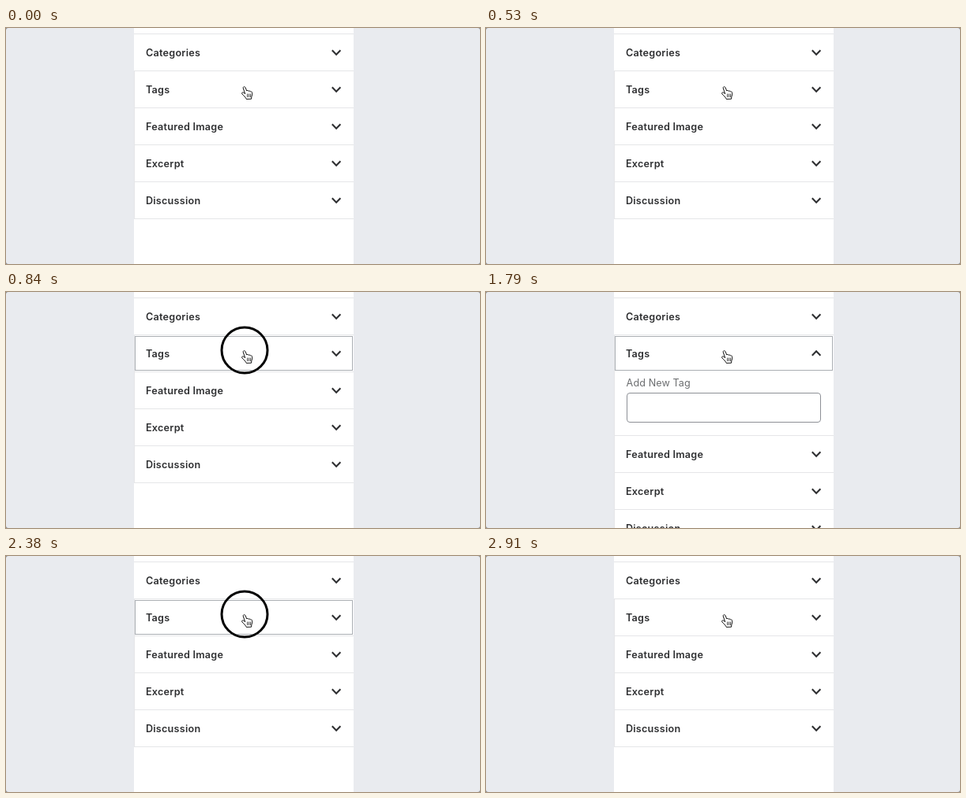
An HTML page with a canvas for the animation above (3220 ms loop, 600x300 px).

```html
<!DOCTYPE html>
<html lang="en">
<head>
<meta charset="utf-8">
<title>Collapsible settings panel</title>
<style>
html, body { margin: 0; width: 100%; height: 100%; overflow: hidden; background: #e9ebef; }
canvas { display: block; width: 600px; height: 300px; }
</style>
</head>
<body>
<canvas id="stage"></canvas>
<script>
const W = 600, H = 300, LOOP = 3220;
const OPEN_AT = 910, CLOSE_AT = 2380;
const CLICKS = [840, 2380], CLICK_TIME = 70;
const PANEL = { x: 162, w: 278 };
const ROW = 47, FIRST = 31, EXTRA = 81;
const LABELS = ["Categories", "Tags", "Featured Image", "Excerpt", "Discussion"];
const FONT = 'Inter, "Open Sans", sans-serif';
const INK = "#2e2f31", LINE = "#e5e6e8";

const canvas = document.getElementById("stage");
const ctx = canvas.getContext("2d");
const ratio = window.devicePixelRatio || 1;
canvas.width = W * ratio;
canvas.height = H * ratio;

function text(label, x, y, weight, size, spacing, color) {
  ctx.font = `${weight} ${size}px ${FONT}`;
  ctx.letterSpacing = `${spacing}px`;
  ctx.fillStyle = color;
  ctx.fillText(label, x, y);
}

function divider(y) {
  ctx.fillStyle = LINE;
  ctx.fillRect(PANEL.x, y, PANEL.w, 1);
}

function chevron(y, up) {
  const d = up ? -2.7 : 2.7;
  ctx.beginPath();
  ctx.moveTo(412.8, y - d);
  ctx.lineTo(418.1, y + d);
  ctx.lineTo(423.4, y - d);
  ctx.strokeStyle = INK;
  ctx.lineWidth = 2.1;
  ctx.lineJoin = "miter";
  ctx.stroke();
}

function focusRing() {
  ctx.strokeStyle = "#555d66";
  ctx.lineWidth = 1;
  ctx.setLineDash([1, 1]);
  ctx.strokeRect(163.5, 56.5, 275, 43);
  ctx.setLineDash([]);
}

function tagField() {
  text("Add New Tag", 177.6, 120, 400, 12.6, 0.1, "#6c6e70");
  ctx.beginPath();
  ctx.roundRect(178.5, 128.5, 245, 37, 3.5);
  ctx.strokeStyle = "#8d9096";
  ctx.lineWidth = 1;
  ctx.stroke();
}

function clickRing() {
  ctx.beginPath();
  ctx.arc(302, 74, 29, 0, Math.PI * 2);
  ctx.strokeStyle = "#000";
  ctx.lineWidth = 3;
  ctx.stroke();
}

const hand = new Path2D(
  "M4.6 9.8 L2.3 3.2 C1.6 1.1 4.1 .1 5 2.1 L6.8 6.4" +
  "C7.2 5.5 8.9 5.6 9.2 6.8 C9.9 6 11.2 6.3 11.5 7.4" +
  "C12.4 6.9 13.5 7.5 13.6 8.8 C13.8 10.6 13.6 12 12.9 13.6" +
  "L12.5 16.6 L6.2 16.8 C5.8 15.2 4 13.6 2.8 12.2" +
  "L.8 10.2 C-.2 8.8 1.6 7.6 2.9 8.6 Z"
);
const creases = new Path2D("M7.5 10.4 V14 M9.5 10.4 V14 M11.5 10.4 V14");

function cursor() {
  ctx.save();
  ctx.translate(298, 73.6);
  ctx.lineJoin = ctx.lineCap = "round";
  ctx.fillStyle = "#fff";
  ctx.fill(hand);
  ctx.strokeStyle = "#111";
  ctx.lineWidth = 1;
  ctx.stroke(hand);
  ctx.lineWidth = 0.8;
  ctx.stroke(creases);
  ctx.restore();
}

function background() {
  ctx.fillStyle = "#85878a";
  ctx.fillRect(0, 0, W, H);
  ctx.beginPath();
  ctx.roundRect(0, 0, W, H, 3);
  ctx.fillStyle = "#e9ebef";
  ctx.fill();
  ctx.fillStyle = "#fff";
  ctx.fillRect(PANEL.x, 0, PANEL.w, H);
}

function draw(t) {
  const open = t >= OPEN_AT && t < CLOSE_AT;
  const clicking = CLICKS.some(c => t >= c && t < c + CLICK_TIME);

  ctx.setTransform(ratio, 0, 0, ratio, 0, 0);
  background();
  divider(7);
  ctx.fillRect(PANEL.x, 54, 1, 188 + (open ? EXTRA : 0));
  LABELS.forEach((label, i) => {
    const y = FIRST + i * ROW + (open && i > 1 ? EXTRA : 0);
    const expanded = open && i === 1;
    text(label, 176.9, y + 5, 600, 12.6, 0.27, INK);
    chevron(y, expanded);
    divider(y + 23 + (expanded ? EXTRA : 0));
  });
  if (open) tagField();
  if (open || clicking) focusRing();
  if (clicking) clickRing();
  cursor();
}

const start = performance.now();
function tick() {
  draw((performance.now() - start) % LOOP);
  requestAnimationFrame(tick);
}
tick();
</script>
</body>
</html>
```
